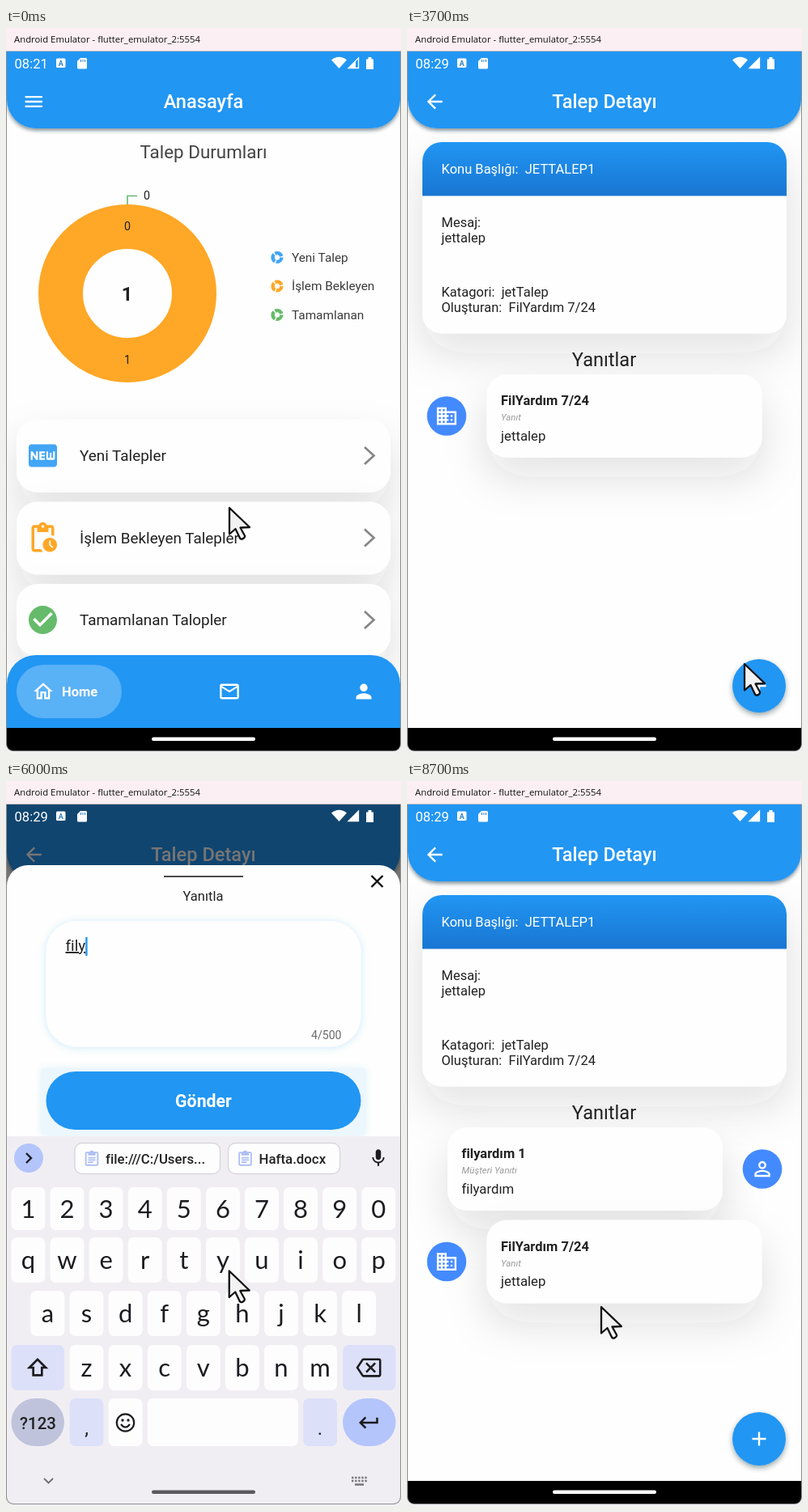
An HTML page for the animation above (8.8 s loop, 488 by 896 pixels).

```html
<!DOCTYPE html>
<html lang="tr">
<head>
<meta charset="utf-8">
<title>Talep</title>
<style>
html, body { margin: 0; width: 100%; height: 100%; overflow: hidden; background: #f1eff0; }
svg { display: block; width: 488px; height: 896px; font-family: Roboto, sans-serif; }
text { white-space: pre; fill: #212121; }
</style>
</head>
<body>
<script>
const LOOP = 8800, STEP = 100;
const BLUE = '#2196f3', PAPER = '#fdfefd', ORANGE = '#ffa726', GREEN = '#66bb6a';
const HELPER = 'FilYardım 7/24', CLIENT = 'filyardım 1', TYPED = 'filyardım';

const ICON = {
  home: 'M12 5.69l5 4.5V18h-2v-6H9v6H7v-7.81l5-4.5M12 3L2 12h3v8h6v-6h2v6h6v-8h3L12 3z',
  mail: 'M22 6c0-1.1-.9-2-2-2H4c-1.1 0-2 .9-2 2v12c0 1.1.9 2 2 2h16c1.1 0 2-.9 2-2V6zm-2 0l-8 5-8-5h16zm0 12H4V8l8 5 8-5v10z',
  person: 'M12 12c2.21 0 4-1.79 4-4s-1.79-4-4-4-4 1.79-4 4 1.79 4 4 4zm0 2c-2.67 0-8 1.34-8 4v2h16v-2c0-2.66-5.33-4-8-4z',
  user: 'M12 5.9a2.1 2.1 0 110 4.2 2.1 2.1 0 010-4.2m0 9c2.97 0 6.1 1.46 6.1 2.1v1.1H5.9V17c0-.64 3.13-2.1 6.1-2.1M12 4C9.79 4 8 5.79 8 8s1.79 4 4 4 4-1.79 4-4-1.79-4-4-4zm0 9c-2.67 0-8 1.34-8 4v3h16v-3c0-2.66-5.33-4-8-4z',
  done: 'M12 2C6.48 2 2 6.48 2 12s4.48 10 10 10 10-4.48 10-10S17.52 2 12 2zm-2 15l-5-5 1.41-1.41L10 14.17l7.59-7.59L19 8l-9 9z',
  back: 'M20 11H7.83l5.59-5.59L12 4l-8 8 8 8 1.41-1.41L7.83 13H20v-2z',
  menu: 'M3 18h18v-2H3v2zm0-5h18v-2H3v2zm0-7v2h18V6H3z',
  office: 'M12 7V3H2v18h20V7H12zM6 19H4v-2h2v2zm0-4H4v-2h2v2zm0-4H4V9h2v2zm0-4H4V5h2v2zm4 12H8v-2h2v2zm0-4H8v-2h2v2zm0-4H8V9h2v2zm0-4H8V5h2v2zm10 12h-8v-2h2v-2h-2v-2h2v-2h-2V9h8v10zm-2-8h-2v2h2v-2zm0 4h-2v2h2v-2z',
  fresh: 'M20 4H4c-1.11 0-1.99.89-1.99 2L2 18c0 1.11.89 2 2 2h16c1.11 0 2-.89 2-2V6c0-1.11-.89-2-2-2zM8.5 15H7.3l-2.55-3.5V15H3.5V9h1.25l2.5 3.5V9H8.5v6zm5-4.74H11v1.12h2.5v1.26H11v1.11h2.5V15h-4V9h4v1.26zm7 3.74c0 .55-.45 1-1 1h-4c-.55 0-1-.45-1-1V9h1.25v4.51h1.13V9.99h1.25v3.51h1.12V9h1.25v5z',
  pending: 'M17 12c-2.76 0-5 2.24-5 5s2.24 5 5 5 5-2.24 5-5-2.24-5-5-5zm1.65 7.35L16.5 17.2V14h1v2.79l1.85 1.85-.7.71zM18 3h-3.18C14.4 1.84 13.3 1 12 1s-2.4.84-2.82 2H6c-1.1 0-2 .9-2 2v15c0 1.1.9 2 2 2h6.11c-.59-.57-1.07-1.25-1.42-2H6V5h2v3h8V5h2v5.08c.71.1 1.38.31 2 .6V5c0-1.1-.9-2-2-2zm-6 2c-.55 0-1-.45-1-1s.45-1 1-1 1 .45 1 1-.45 1-1 1z',
  mic: 'M12 14c1.66 0 2.99-1.34 2.99-3L15 5c0-1.66-1.34-3-3-3S9 3.34 9 5v6c0 1.66 1.34 3 3 3zm5.3-3c0 3-2.54 5.1-5.3 5.1S6.7 14 6.7 11H5c0 3.41 2.72 6.23 6 6.72V21h2v-3.28c3.28-.48 6-3.3 6-6.72h-1.7z',
  erase: 'M22 3H7c-.69 0-1.23.35-1.59.88L0 12l5.41 8.11c.36.53.9.89 1.59.89h15c1.1 0 2-.9 2-2V5c0-1.1-.9-2-2-2zm0 16H7.07L2.4 12l4.66-7H22v14zm-11.59-2L14 13.41 17.59 17 19 15.59 15.41 12 19 8.41 17.59 7 14 10.59 10.41 7 9 8.41 12.59 12 9 15.59z',
  enter: 'M19 7v4H5.83l3.58-3.59L8 6l-6 6 6 6 1.41-1.41L5.83 13H21V7z',
  clip: 'M19 3h-4.2a3 3 0 0 0-5.6 0H5a2 2 0 0 0-2 2v15a2 2 0 0 0 2 2h14a2 2 0 0 0 2-2V5a2 2 0 0 0-2-2zM5 20V5h2v3h10V5h2v15zM7 10h10v2H7zm0 3h10v2H7zm0 3h7v2H7z',
  shift: 'M12 3L2 13h5v7h10v-7h5zm0 2.8L17.2 11H15v7H9v-7H6.800z'
};

// Markup helpers
const icon = (name, x, y, size = 28.4, fill = '#fff', more = '') =>
  `<path ${more} d="${ICON[name]}" fill="${fill}" fill-rule="evenodd" transform="translate(${x - size / 2} ${y - size / 2}) scale(${size / 24})"/>`;
const text = (x, y, size, str, more = '') => `<text x="${x}" y="${y}" font-size="${size}" ${more}>${str}</text>`;
const box = (x, y, w, h, r, fill, more = '') =>
  `<rect x="${x}" y="${y}" width="${w}" height="${h}" rx="${r}" fill="${fill}" ${more}/>`;
const disc = (x, y, r, fill, more = '') => `<circle cx="${x}" cy="${y}" r="${r}" fill="${fill}" ${more}/>`;
const line = (d, color, w, more = '') => `<path d="${d}" fill="none" stroke="${color}" stroke-width="${w}" ${more}/>`;
const MID = 'text-anchor="middle"', WHITE = 'style="fill:#fff"', BOLD = 'font-weight="700"';
const SOFT = 'filter="url(#soft)"', GLOW = 'filter="url(#glow)"';
const shadow = (id, dy, blur, color, alpha, pad) =>
  `<filter id="${id}" x="-${pad}" y="-${pad}" width="${1 + 2 * pad}" height="${1 + 2 * pad}">
   <feDropShadow dx="0" dy="${dy}" stdDeviation="${blur}" flood-color="${color}" flood-opacity="${alpha}"/></filter>`;

const appBar = (title, left, id = '') =>
  `<path d="M1 29H487V88a36 36 0 0 1-36 36H37a36 36 0 0 1-36-36z" fill="${BLUE}" filter="url(#bar)"/>
   ${icon(left, 34.3, 91)}${text(244, 99, 23.6, title, `id="${id}" ${MID} ${WHITE} font-weight="500"`)}`;

const menuCard = (y, name, color, label) =>
  box(13, y, 462, 90, 26, PAPER, SOFT) + icon(name, 45.5, y + 44.5, 42, color) +
  text(91, y + 51, 18.9, label) + line(`M443 ${y + 34}l11.500 10.500l-11.500 10.500`, '#868686', 2.7);

const legend = (y, color, label) =>
  disc(335, y, 5.4, 'none', `stroke="${color}" stroke-width="4.4" pathLength="90" stroke-dasharray="26 4"`) +
  text(353, y + 5.3, 15.35, label, 'style="fill:#3a3a3a"');

const subject = (bottom) =>
  box(19, 141, 450, bottom - 141, 24, PAPER, SOFT) +
  `<path d="M19 207.500V165a24 24 0 0 1 24-24H445a24 24 0 0 1 24 24V207.500z" fill="url(#head)"/>` +
  text(42.5, 180, 16.5, 'Konu Başlığı:  JETTALEP1', WHITE);

const reply = (x, avatar, name, who, kind, msg) =>
  box(x, 428, 340, 103, 25, PAPER, SOFT) + disc(avatar, 479.5, 24.3, '#448aff') + icon(name, avatar, 479.5, 29) +
  text(x + 17.5, 466, 16.5, who, BOLD) +
  text(x + 17.5, 485, 11.5, kind, 'font-style="italic" style="fill:#9a9a9a"') + text(x + 17.5, 509.5, 16.8, msg);

// Keyboard
const PITCH = 48.1;
const key = (x, y, w, h, fill = '#fefdfe', r = 7) => box(x, y, w, h, r, fill);
const keyRow = (chars, x, y, h) => [...chars].map((c, i) =>
  key(x + i * PITCH, y, 41.8, h) +
  text(x + 20.9 + i * PITCH, y + h / 2 + 11, 31, c, `${MID} font-family="Lato, sans-serif" style="fill:#1c1b1f"`)).join('');
const chip = (x, w, label) => box(x, 447.5, w, 38, 9, '#fefdfe', 'stroke="#d5d5dc" stroke-width="1.3"') +
  icon('clip', x + 21, 466.5, 22, '#aebff5') + text(x + 38, 473, 16.8, label, 'font-weight="500"');
const keyboard = () => box(1, 439, 486, 470, 0, '#f1eef3') +
  disc(28, 466, 18, '#b4c5fb') + line('M25 460l6 6l-6 6', '#1c1b1f', 2.4) +
  `<g id="chips">${chip(85, 179.5, 'file:///C:/Users...')}${chip(274.5, 138, 'Hafta.docx')}</g>` +
  icon('mic', 460, 466, 26, '#1c1b1f') +
  keyRow('1234567890', 6.5, 502, 53) + keyRow('qwertyuiop', 6.5, 564, 56) +
  keyRow('asdfghjkl', 30.5, 630, 56) + keyRow('zxcvbnm', 78.600, 697, 56) +
  key(6.5, 697, 65.5, 56, '#dce1f9') + icon('shift', 39, 725, 32, '#1c1b1f') +
  key(416, 697, 65.5, 56, '#dce1f9') + icon('erase', 448, 725, 31, '#1c1b1f') +
  key(6.5, 763, 65.5, 59, '#bfc4dc', 29.5) + text(39.500, 801, 20.5, '?123', MID + ' font-weight="500"') +
  key(78.6, 763, 41.8, 59, '#dce1f9') + text(99.500, 808, 24, ',', MID) +
  key(126.700, 763, 41.8, 59) + disc(147.500, 793, 10.7, 'none', 'stroke="#1c1b1f" stroke-width="2.2"') +
  disc(144, 790, 1.7, '#1c1b1f') + disc(151, 790, 1.7, '#1c1b1f') + line('M142 795q5.500 7 11 0', '#1c1b1f', 2.1) +
  key(174.800, 763, 186, 59) + key(367.200, 763, 41.8, 59, '#dce1f9') + text(388, 808, 24, '.', MID) +
  key(416, 763, 65.5, 59, '#b4c5fb', 29.5) + icon('enter', 448.500, 793, 30, '#1c1b1f') +
  line('M47 862l5.500 5.500l5.500-5.500', '#6f6d73', 1.8) +
  line('M427 861h19m-19 4h19', '#77757a', 2.4, 'stroke-dasharray="2.4 1.7"') + line('M431 869.500h11', '#77757a', 2.4);

document.body.innerHTML = `<svg viewBox="0 0 488 896">
<defs>
  ${shadow('soft', 24, 25, '#302838', .13, .9)}${shadow('bar', 3, 2.2, '#123', .45, .3)}
  ${shadow('glow', 1, 5, BLUE, .2, .3)}${shadow('fabs', 3, 3, '#123', .4, .4)}${shadow('snk', 4, 3, '#000', .45, .4)}
  <linearGradient id="head" x2="0" y2="1"><stop stop-color="${BLUE}"/><stop offset="1" stop-color="#1976d2"/></linearGradient>
  <linearGradient id="ok"><stop stop-color="#4caf50"/><stop offset="1" stop-color="#66bb6a"/></linearGradient>
  <clipPath id="phone"><path d="M1 28.500H487V885a8 8 0 0 1-8 8H9a8 8 0 0 1-8-8z"/></clipPath>
  <clipPath id="page"><rect x="1" y="29" width="486" height="836"/></clipPath>
</defs>
<rect width="488" height="896" fill="#f1eff0"/>
<path d="M0 28V885a9 9 0 0 0 9 9H479a9 9 0 0 0 9-9V28z" fill="#8f8f8f"/>
<rect width="488" height="28.500" fill="#fbeff3"/>
${text(10, 18, 11.35, 'Android Emulator - flutter_emulator_2:5554', 'font-family="Open Sans, sans-serif" style="fill:#111"')}
<g clip-path="url(#phone)">
  <g id="main" clip-path="url(#page)">
    ${box(1, 29, 486, 836, 0, PAPER)}
    <g id="home">
      ${text(244, 161, 22.4, 'Talep Durumları', MID + ' style="fill:#444"')}
      ${disc(150, 328, 82.5, 'none', `stroke="${ORANGE}" stroke-width="55"`)}
      ${line('M150 218V207.500H162', GREEN, 1.6)}
      ${text(174, 212, 14.2, '0', MID)}${text(150, 250, 14.2, '0', MID)}${text(150, 415, 14.2, '1', MID)}
      ${text(149.5, 337, 23.6, '1', MID + BOLD.padStart(18))}
      ${legend(283.5, '#42a5f5', 'Yeni Talep')}${legend(319, ORANGE, 'İşlem Bekleyen')}${legend(354.5, GREEN, 'Tamamlanan')}
      ${menuCard(484, 'fresh', '#42a5f5', 'Yeni Talepler')}
      ${menuCard(585.5, 'pending', ORANGE, 'İşlem Bekleyen Talepler')}
      ${menuCard(687, 'done', GREEN, 'Tamamlanan Talopler')}
    </g>
    <g id="list">${subject(301)}${text(42.5, 246, 16.5, 'Mesaj:')}${text(42.5, 265, 16.5, 'jettalep')}</g>
    ${appBar('Anasayfa', 'menu', 'title')}
    <path d="M1 865V811a36 36 0 0 1 36-36H451a36 36 0 0 1 36 36V865z" fill="${BLUE}"/>
    ${box(13, 787, 130, 66, 33, '#fff', 'id="pill" fill-opacity=".25"')}
    ${icon('home', 46, 820)}<g id="mail">${icon('mail', 276, 820)}</g>${icon('person', 442, 820)}
    ${text(69, 826, 16.5, 'Home', `id="tabA" ${WHITE} ${BOLD}`)}
    ${text(228, 826, 16.5, 'Talepler', `id="tabB" ${WHITE} ${BOLD}`)}
  </g>
  <rect id="scrim" x="1" y="29" width="486" height="836"/>
  <g id="detail" clip-path="url(#page)">
    ${box(1, 29, 486, 836, 0, PAPER)}
    <circle id="spin" cx="251" cy="145.600" r="21.800" fill="none" stroke="${BLUE}" stroke-width="5.500" pathLength="100"/>
    <g id="content">
      ${subject(377.5)}
      ${text(42.5, 246, 16.5, 'Mesaj:')}${text(42.5, 265, 16.5, 'jettalep')}
      ${text(42.5, 331.5, 16.5, 'Katagori:  jetTalep')}${text(42.5, 350.5, 16.5, 'Oluşturan:  ' + HELPER)}
      ${text(243.5, 418, 23.6, 'Yanıtlar', MID)}
      <g id="newReply">${reply(50, 439, 'user', CLIENT, 'Müşteri Yanıtı', TYPED)}</g>
      <g id="oldReply">${reply(98.5, 49, 'office', HELPER, 'Yanıt', 'jettalep')}</g>
      ${disc(435, 813, 33, BLUE, 'filter="url(#fabs)"')}${line('M426.500 813h17m-8.500-8.500v17', '#fff', 2.4)}
    </g>
    ${appBar('Talep Detayı', 'back')}
  </g>
  <rect id="barrier" x="1" y="29" width="486" height="836"/>
  <g id="sheet">
    <path d="M1 1400V554a26 26 0 0 1 26-26H461a26 26 0 0 1 26 26V1400z" fill="${PAPER}"/>
    ${line('M195 542h98', '#4a4a4a', 2.2)}${text(243.5, 571.5, 16.5, 'Yanıtla', MID)}
    ${line('M451.500 541l14 14m0-14l-14 14', '#111', 2.4)}
    ${box(49.5, 597, 389, 155.5, 38, PAPER, GLOW)}
    ${text(73.5, 634, 18.9, 'Açıklama Giriniz', 'id="hint" style="fill:#6b6b6b"')}
    ${text(73.5, 634, 18.9, '', 'id="typed"')}
    <rect id="caret" y="617" width="2.400" height="23" fill="${BLUE}"/>
    ${text(414.5, 743, 14.1, '0/500', 'id="count" text-anchor="end" style="fill:#6b6b6b"')}
    ${box(44, 779, 400, 82, 3, '#e6f3fe', 'filter="url(#glow)" opacity=".7"')}
    ${box(49.5, 783, 389, 72, 36, BLUE, 'id="button"')}
    ${text(244, 827, 21.3, 'Gönder', `id="send" ${MID} ${WHITE} ${BOLD}`)}
    <g id="busy">
      ${disc(165, 819, 13, 'none', 'id="wheel" stroke="#fff" stroke-width="3.600" pathLength="100" stroke-dasharray="46 54"')}
      ${text(201, 827, 21.3, 'Gönderiliyor...', WHITE + ' ' + BOLD)}
    </g>
  </g>
  <rect x="1" y="865" width="486" height="31"/>
  <g id="keys">${keyboard()}</g>
  <g id="snack">
    ${box(13, 69, 462, 58, 13, 'url(#ok)', 'filter="url(#snk)"')}
    <g id="tick">${disc(37.5, 97.5, 10.7, 'none', 'stroke="#fff" stroke-width="2.200"')}${line('M32 97.500l4 4l7.500-8', '#fff', 2.2)}</g>
    ${text(67, 103.5, 16.5, 'Yanıtınız Başarıyla Gönderildi!', WHITE)}
  </g>
  ${text(10.5, 50, 16.6, '08:21', `id="clock" ${WHITE}`)}
  ${box(62, 37.5, 11.5, 11.5, 1.5, '#fff')}${text(67.8, 46.8, 9, 'A', `${MID} ${BOLD} style="fill:#2a7fc4"`)}
  <path d="M92 37h6.500a1.500 1.500 0 0 1 1.500 1.500V49a1.500 1.500 0 0 1-1.500 1.500H89.500A1.500 1.500 0 0 1 88 49V41z" fill="#fff"/>
  ${line('M92.500 39v3m2.500-3v3m2.500-3v3', '#2a7fc4', 1)}
  <path d="M411.500 50L402 39.500q9.500-7.500 19 0z" fill="#fff"/>
  <path id="signal" d="M423 49.500H435.500V37z" stroke="#fff" stroke-width="1.300"/><path d="M423 49.500h9V41z" fill="#fff"/>
  <path d="M445 38.500h2.500V36h4v2.500H454V51H445z" fill="#fff"/>
  ${box(180, 876.5, 128, 4.5, 2.2, '#fff', 'id="handle"')}
</g>
<path id="cursor" d="M0 0V32.500L7.500 26L13 37.500q1.500 2 4 .5t2-3.500L13.500 24.500L25 24z" fill="#f2f2f3" stroke="#111" stroke-width="2.300" stroke-linejoin="round"/>
</svg>`;

const $ = Object.fromEntries([...document.querySelectorAll('svg [id]')].map(e => [e.id, e]));
const show = (e, on) => e.setAttribute('display', on ? 'inline' : 'none');
const set = (e, attrs) => { for (const k in attrs) e.setAttribute(k, attrs[k]); };
const move = (e, x, y) => set(e, { transform: `translate(${x} ${y})` });
const zoom = (e, s) => set(e, { transform: `translate(244 446.5) scale(${s}) translate(-244 -446.5)` });

// Linear interpolation in a table of [time, value, ...] rows
function at(t, rows) {
  let i = rows.findIndex(r => r[0] > t);
  if (i < 0) i = rows.length;
  const a = rows[Math.max(i - 1, 0)], b = rows[Math.min(i, rows.length - 1)];
  const k = b[0] > a[0] ? (t - a[0]) / (b[0] - a[0]) : 0;
  return a.slice(1).map((v, n) => v + (b[n + 1] - v) * k);
}

const POINTER = [
  [0, 276, 593], [100, 262, 578], [300, 232, 552], [400, 246, 600], [500, 272, 670], [600, 280, 702],
  [700, 280, 702], [800, 276, 760], [900, 271, 802], [1400, 271, 802], [1700, 255, 500], [2000, 241, 260],
  [3200, 241, 260], [3400, 300, 430], [3600, 405, 750], [3700, 417, 786], [3900, 422, 800], [4400, 422, 800],
  [4700, 320, 720], [4900, 272, 675], [5100, 271, 674], [5900, 271, 674], [6300, 290, 400], [6500, 290, 400],
  [6700, 303, 478], [7000, 250, 620], [7200, 231, 658], [7500, 231, 656], [8100, 231, 656], [8700, 240, 650]
];
const SHEET = [
  [4100, 340], [4200, 220], [4300, 80], [4400, 15], [4500, 0], [5500, 0], [5600, -150], [5700, -330], [5800, -424],
  [7400, -424], [7500, -412], [7600, -260], [7700, -90], [7800, 0], [7900, 150], [8000, 300], [8100, 340]
];
const KEYS = [
  [5400, 470], [5500, 434], [5600, 240], [5700, 60], [5800, 0], [7200, 0], [7300, 40], [7400, 210], [7500, 368], [7600, 470]
];
const DIM = [[4100, 0], [4300, .46], [4400, .54], [7700, .54], [8100, 0]];
const SNACK = [[6600, -110], [6700, -49], [6800, -8], [6900, 0], [7800, 0], [8100, -110]];
const TAB = [[1200, 0], [1300, .3], [1400, .8], [1500, 1]];

function draw(t) {
  const [tab] = at(t, TAB);
  show($.home, tab < 1);
  show($.list, tab > 0);
  move($.home, -488 * tab, 0);
  move($.list, 488 * (1 - tab), 0);
  $.title.textContent = tab > .2 ? 'Talepler' : 'Anasayfa';
  set($.pill, { x: 13 + 159 * tab, width: 130 + 15 * tab });
  set($.tabA, { opacity: Math.max(0, 1 - 2 * tab) });
  set($.tabB, { opacity: Math.max(0, 2 * tab - 1) });
  move($.mail, -71 * tab, 0);

  const open = t >= 2400, loaded = t >= 3000;
  show($.detail, open);
  show($.main, t < 2700);
  zoom($.main, open ? 1.05 : 1);
  zoom($.detail, at(t, [[2400, .91], [2500, .9855], [2600, 1]])[0]);
  set($.scrim, { opacity: open ? at(t, [[2400, .45], [2500, .6]])[0] : 0 });
  const arc = at(t, [[2500, 5], [2900, 32]])[0];
  show($.spin, !loaded);
  set($.spin, { 'stroke-dasharray': `${arc} ${50 - arc}`, transform: `rotate(${-92 + (t - 2500) * .5} 251 145.6)` });
  show($.content, loaded);
  show($.newReply, t >= 8200);
  move($.oldReply, 0, t >= 8200 ? 114.5 : 0);

  set($.barrier, { opacity: at(t, DIM)[0] });
  show($.sheet, t >= 4100 && t < 8100);
  move($.sheet, 0, at(t, SHEET)[0]);
  const typed = TYPED.slice(0, Math.floor(at(t, [[5800, 0], [6200, TYPED.length]])[0]));
  const focus = t >= 5300 && t < 7300;
  const sending = t >= 6500 && t < 7300;
  show($.hint, !typed);
  $.typed.textContent = typed;
  set($.typed, { 'text-decoration': focus ? 'underline' : 'none' });
  show($.caret, focus);
  set($.caret, { x: 73.5 + (typed ? $.typed.getComputedTextLength() : 0) });
  $.count.textContent = `${typed.length}/500`;
  set($.button, { fill: sending ? '#38a2f5' : BLUE });
  show($.send, !sending);
  show($.busy, sending);
  set($.wheel, { transform: `rotate(${(t - 6700) * .45} 165 819)` });

  const [down] = at(t, KEYS);
  show($.keys, down < 470);
  show($.chips, t >= 5800 && t < 7300);
  move($.keys, 0, down);
  set($.handle, { fill: down < 400 ? '#5b595e' : '#fff' });
  const [rise] = at(t, SNACK);
  show($.snack, rise > -110);
  move($.snack, 0, rise);
  set($.tick, { opacity: at(t, [[6700, 1], [7100, .45], [7300, .8], [7500, .45]])[0] });

  const late = t >= 3300;
  $.clock.textContent = late ? '08:29' : '08:21';
  set($.signal, { fill: late ? '#fff' : 'none' });
  move($.cursor, ...at(t, POINTER));
}

const start = performance.now();
function tick() {
  const t = (performance.now() - start) % LOOP;
  draw(Math.floor(t / STEP) * STEP);
  requestAnimationFrame(tick);
}
tick();
</script>
</body>
</html>
```
